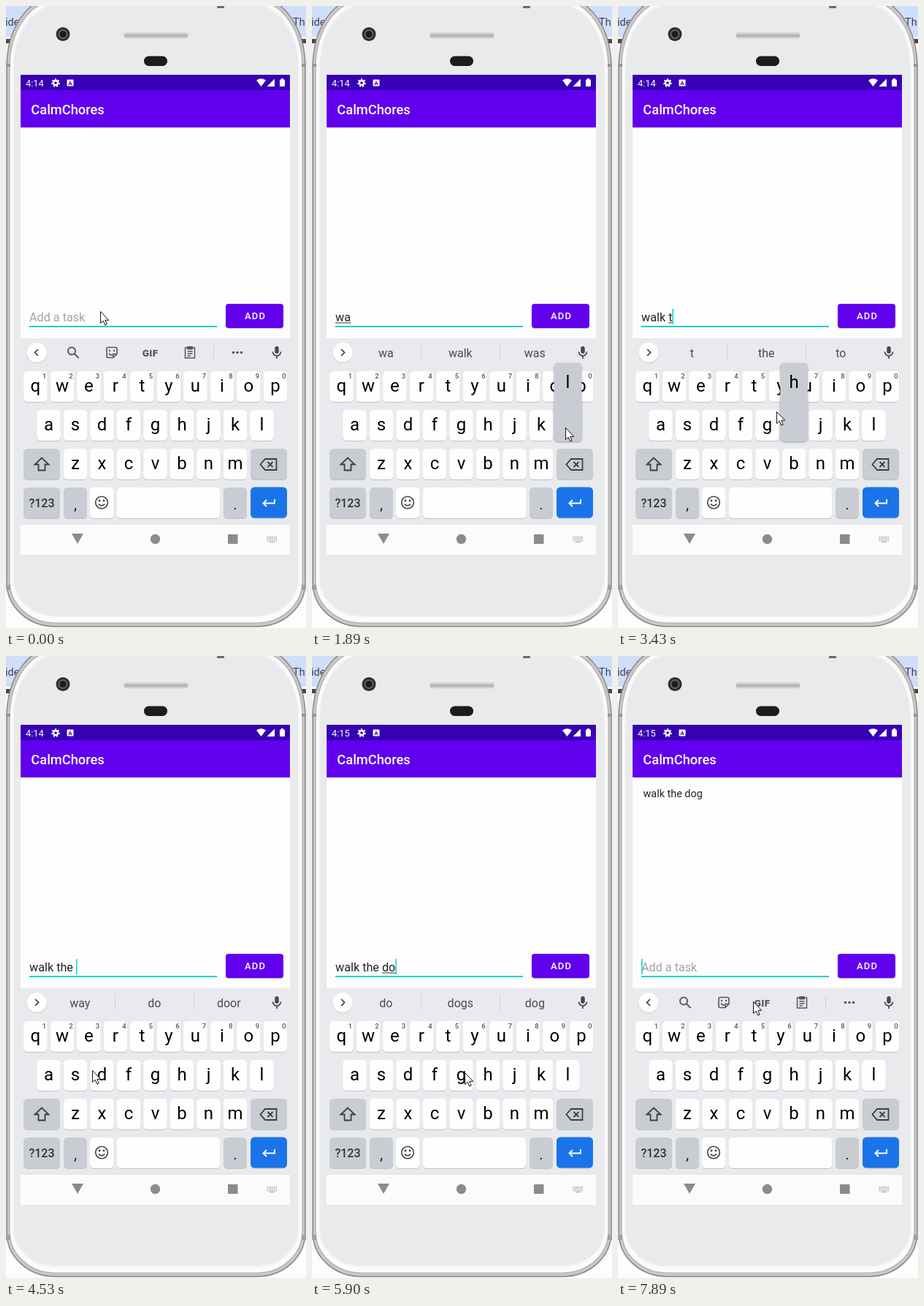
An HTML page with a canvas that plays this animation: 411x850 px, repeating every 8 s.

```html
<!DOCTYPE html>
<html lang="en">
<head>
<meta charset="utf-8">
<title>Task list demo</title>
<style>
  html, body { margin: 0; height: 100%; overflow: hidden; background: #fff; }
  canvas { display: block; width: 411px; height: 850px; }
</style>
</head>
<body>
<canvas width="411" height="850"></canvas>
<script>
const canvas = document.querySelector('canvas');
const screenCtx = canvas.getContext('2d');
let ctx = screenCtx;

const LOOP = 8000;
const INK = '#000', ICON = '#54575b', FUNCTION_KEY = '#caccd3', PURPLE = '#6100ed';

// The picture is held between steps: [start, count], 120 ms apart within a run.
const STEPS = [
  [0, 1], [280, 7], [1150, 1], [1290, 7], [2130, 3], [2510, 2], [2800, 3],
  [3190, 4], [3700, 1], [3850, 1], [4000, 3], [4380, 1], [4530, 4], [5040, 4],
  [5540, 4], [6050, 1], [6200, 4], [6720, 1], [6860, 1], [7110, 4], [7620, 2], [7890, 1]
].flatMap(([start, count]) => Array.from({ length: count }, (_, i) => start + i * 120));

// Time, field text, suggestions
const EDITS = [
  [-600, '', null],
  [760, 'w', ['w', 'with', 'what']],
  [1290, 'wa', ['wa', 'walk', 'was']],
  [2010, 'wal', ['wal', 'walk', 'wall']],
  [2250, 'walk', ['walk', 'Walk', 'walking']],
  [2800, 'walk ', ['to', 'the', 'with']],
  [3190, 'walk t', ['t', 'the', 'to']],
  [3550, 'walk th', ['th', 'the', 'that']],
  [3850, 'walk the', ['the', 'they', 'then']],
  [4380, 'walk the ', ['way', 'do', 'door']],
  [5040, 'walk the d', ['d', 'do', 'day']],
  [5540, 'walk the do', ['do', 'dogs', 'dog']],
  [6050, 'walk the dog', ['dog', 'Dog', 'Dogs']],
  [6720, '', null]
];

// Key, pressed from, released at
const PRESSES = [
  ['w', 640, 760], ['l', 1890, 2010], ['k', 2130, 2250], [' ', 2640, 2800],
  ['t', 3040, 3190], ['h', 3430, 3550], ['e', 3850, 4000], ['d', 4770, 5040], ['o', 5400, 5540]
];

// Time, x, y of the mouse pointer
const POINTER = [
  [160, 129, 417], [640, 70, 515], [1000, 64, 549], [1150, 63, 555], [1290, 63, 557],
  [1770, 345, 574], [1890, 347, 576], [2010, 312, 574], [2250, 308, 577], [2370, 235, 649],
  [2510, 217, 679], [2800, 217, 679], [3040, 186, 523], [3190, 190, 528], [3430, 217, 554],
  [3550, 162, 534], [3700, 108, 516], [3850, 108, 518], [4240, 150, 671], [4380, 165, 646],
  [4530, 118, 566], [5040, 124, 571], [5400, 325, 523], [5540, 324, 525], [5900, 209, 569],
  [6050, 240, 491], [6570, 340, 420], [6720, 340, 420], [6860, 244, 416], [7110, 225, 372],
  [7470, 180, 249], [7740, 184, 464], [7890, 185, 472]
];

const ROWS = [
  { keys: 'qwertyuiop', x: 40.4, top: 499 },
  { keys: 'asdfghjkl', x: 58.5, top: 552 },
  { keys: 'zxcvbnm', x: 95, top: 605 }
];
const PITCH = 36.5;

function rect(x, y, w, h, color, radius = 0) {
  ctx.fillStyle = color;
  ctx.beginPath();
  ctx.roundRect(x, y, w, h, radius);
  ctx.fill();
}

function circle(x, y, r, color) {
  rect(x - r, y - r, 2 * r, 2 * r, color, r);
}

function shape(d, x, y, fill, stroke, width = 1.7) {
  const path = new Path2D(d);
  ctx.save();
  ctx.translate(x, y);
  if (fill) { ctx.fillStyle = fill; ctx.fill(path); }
  if (stroke) { ctx.strokeStyle = stroke; ctx.lineWidth = width; ctx.stroke(path); }
  ctx.restore();
}

function text(str, x, y, size, color, { weight = 400, align = 'left', spacing = 0 } = {}) {
  ctx.font = `${weight} ${size}px Roboto, sans-serif`;
  ctx.letterSpacing = spacing + 'px';
  ctx.textAlign = align;
  ctx.fillStyle = color;
  ctx.fillText(str, x, y);
  const width = ctx.measureText(str).width;
  ctx.letterSpacing = '0px';
  return width;
}

function shadowed(blur, offset, color, draw) {
  ctx.save();
  ctx.shadowBlur = blur;
  ctx.shadowOffsetY = offset;
  ctx.shadowColor = color;
  draw();
  ctx.restore();
}

function keyCap(x, top, w, color = '#fefefe') {
  rect(x, top + 1, w, 42, '#bfc1c6', 5.5);
  rect(x, top, w, 42, color, 5.5);
}

function drawPhone() {
  rect(0, 0, 411, 850, '#fdfdfd');
  rect(0, 0, 411, 42, '#cfdffa');
  rect(0, 45, 411, 6, '#4b4644');
  text('ide', -1, 27, 14.5, '#39424f');
  text('Th', 393, 27, 14.5, '#39424f');

  // Nested outlines: metal edge, bright bevel, front panel
  shape('M1 83A66 95 0 0 1 67 -12H344A66 95 0 0 1 410 83V788A66 60 0 0 1 344 848H67A66 60 0 0 1 1 788Z',
    0, 0, '#cbc7c8', '#8b8688', 1.5);
  shape('M5 84A63 91 0 0 1 68 -7H343A63 91 0 0 1 406 84V786A62 57 0 0 1 344 843H67A62 57 0 0 1 5 786Z',
    0, 0, '#fbfbfb', '#b3aeaf', 1.2);
  shape('M10 86A60 88 0 0 1 70 -2H341A60 88 0 0 1 401 86V782A57 52 0 0 1 344 834H67A57 52 0 0 1 10 782Z',
    0, 0, '#e9eaec', '#f3f3f4', 2);
  for (const x of [0, 405]) {
    rect(x, 79, 6, 4, '#989394');
    rect(x, 791, 6, 7, '#a39e9f');
  }
  rect(289, 0, 10, 3, '#6d696b', 1);

  circle(78, 38.5, 9.5, '#2d2d30');
  circle(78, 38.5, 6.5, '#606266');
  circle(78, 38.5, 4.5, '#1a1b1e');
  rect(161, 36, 89, 8.5, '#d6d4d5', 4);
  rect(162, 38.5, 87, 4, '#b9b5b6', 2);
  rect(189, 68.5, 32, 13.5, '#1d1b1e', 6.5);
}

function drawStatusBar() {
  rect(20, 94, 369, 22, '#3800b3');
  rect(20, 115, 369, 51, PURPLE);
  text('CalmChores', 34.3, 148, 18.3, '#fff', { weight: 500 });

  ctx.save();
  ctx.setLineDash([2.1, 2.1]);
  shape('M4.8 0A4.8 4.8 0 1 1 -4.8 0A4.8 4.8 0 1 1 4.8 0', 68, 105, null, '#fff', 2);
  ctx.restore();
  shape('M3 0A3 3 0 1 1 -3 0A3 3 0 1 1 3 0', 68, 105, null, '#fff', 2.4);
  rect(83.5, 100.5, 9, 9, '#fff', 1);
  text('A', 88, 108, 8, '#3800b3', { weight: 700, align: 'center' });

  shape('M-6.5 -3.5Q0 -8 6.5 -3.5L0 5Z', 349.5, 105, '#fff');
  shape('M5 -5.5V5H-5.5Z', 363, 105, '#fff');
  rect(375, 100.5, 7, 9.5, '#fff', 1);
  rect(377, 99, 3, 2, '#fff');
}

function drawKeyboard() {
  rect(20, 454, 369, 254, '#e8eaed');
  ROWS.forEach((row, r) => [...row.keys].forEach((key, i) => {
    const x = row.x + i * PITCH;
    keyCap(x - 16.3, row.top, 32.6);
    text(key, x, row.top + 28, 24, INK, { align: 'center' });
    if (r === 0) text(String((i + 1) % 10), x + 12, 509, 9.5, ICON, { weight: 500, align: 'center' });
  }));

  keyCap(24, 605, 50, FUNCTION_KEY);
  shape('M0 -9L-9.5 0H-4.5V8H4.5V0H9.5Z', 49, 626.5, null, '#3b3d41', 1.8);
  keyCap(335, 605, 50, FUNCTION_KEY);
  shape('M-11.5 0L-5 -7.5H10.5V7.5H-5ZM-1.5 -3.5L5.5 3.5M5.5 -3.5L-1.5 3.5', 360, 626.5, null, '#3b3d41', 1.8);

  keyCap(24, 658, 50, FUNCTION_KEY);
  text('?123', 49, 685, 16, '#303236', { weight: 500, align: 'center' });
  keyCap(79, 658, 32, FUNCTION_KEY);
  text(',', 95, 688, 21, '#202124', { align: 'center' });
  keyCap(115, 658, 32.5);
  shape('M8.3 0A8.3 8.3 0 1 1 -8.3 0A8.3 8.3 0 1 1 8.3 0M-4.2 2Q0 6.8 4.2 2', 131, 678.5, null, '#404246', 1.6);
  circle(128, 676, 1.4, '#404246');
  circle(134, 676, 1.4, '#404246');
  keyCap(152, 658, 141.5);
  keyCap(298, 658, 32, FUNCTION_KEY);
  text('.', 314, 688, 21, '#202124', { align: 'center' });
  keyCap(335, 657.5, 50, '#1a73e8');
  shape('M8 -5V0.5H-7M-3 -4L-7.5 0.5L-3 5', 360, 679, null, '#fff', 1.9);
}

function drawNavigation() {
  rect(20, 708, 369, 42, '#fbfbfc');
  rect(20, 707.5, 369, 1, '#dfe0e3');
  shape('M-8 -7H8L0 7Z', 98, 728, '#8b8b8b');
  circle(204.5, 728.5, 6.7, '#8b8b8b');
  rect(304, 722, 13.5, 13, '#8b8b8b');
  for (let row = 0; row < 3; row++)
    for (let col = 0; col < 6; col++) rect(357.5 + col * 2.4, 725 + row * 2.4, 1.4, 1.4, '#a2a2a2');
  rect(361, 732, 7, 1, '#a2a2a2');
}

function drawToolbar(suggestions) {
  shadowed(2, 1, '#0002', () => circle(42, 473.5, 13.5, '#fefefe'));
  shape(suggestions ? 'M-2 -4.5L2.5 0L-2 4.5' : 'M2 -4.5L-2.5 0L2 4.5', 42, 473.5, null, '#3c4043', 1.7);
  rect(368.3, 465, 5.4, 10, '#45474b', 2.7);
  shape('M-5.5 -1A5.5 5.5 0 0 0 5.5 -1M0 4.5V8.5', 371, 473.5, null, '#45474b', 1.7);

  if (suggestions) {
    suggestions.forEach((word, i) =>
      text(word, 101.3 + i * 102, 480, 16, '#484b4f', { align: 'center' }));
    for (const x of [149, 257]) rect(x, 463, 1, 21, '#cfd1d5');
    return;
  }
  shape('M3 -2A5 5 0 1 1 -7 -2A5 5 0 1 1 3 -2M1.8 1.8L7.5 7.5', 92, 473.5, null, ICON, 2);
  shape('M-5 -7H5Q7 -7 7 -5V2L2 7H-5Q-7 7 -7 5V-5Q-7 -7 -5 -7ZM2 7V2H7M-4 1Q-2 4.5 1 3', 145, 473.5, null, ICON, 1.6);
  circle(142, 471, 1.2, ICON);
  circle(148, 471, 1.2, ICON);
  text('GIF', 197.7, 478.5, 13.5, ICON, { weight: 900, align: 'center', spacing: 0.4 });
  shape('M-6.5 -6.5H6.5V7.5H-6.5ZM-3.5 -1.5H3.5M-3.5 1.5H3.5M-3.5 4.5H1', 252, 473.5, null, ICON, 1.5);
  rect(248, 465, 8, 4.5, ICON, 1);
  rect(284, 464, 1, 20, '#cfd1d5');
  for (const x of [311.5, 317, 322.5]) circle(x, 473.5, 1.8, ICON);
}

function drawField(content, caretOn) {
  const x = 32, baseline = 431, size = 16.2;
  let end = x;
  if (content) {
    end += text(content, x, baseline, size, '#212121');
    const wordStart = content.lastIndexOf(' ') + 1;
    const left = x + ctx.measureText(content.slice(0, wordStart)).width;
    rect(left, 432.5, end - left, 1, '#303030');
  } else {
    text('Add a task', x, baseline, size, '#a3a3a3');
  }
  rect(32, 437, 257, 2, '#14d3c4');
  if (caretOn) rect(end, 414, 1.6, 21, '#14d3c4');
}

function drawButton(glow) {
  shadowed(glow ? 4 : 1, 1, '#0004', () => rect(301, 407, 79, 33, PURPLE, 4));
  if (glow) rect(301, 407, 79, 33, `rgba(255,255,255,${glow})`, 4);
  text('ADD', 341.5, 428, 13, '#fff', { weight: 500, align: 'center', spacing: 1.2 });
}

function drawPress(key) {
  if (key === ' ') return keyCap(152, 658, 141.5, FUNCTION_KEY);
  const row = ROWS.find(r => r.keys.includes(key));
  const x = row.x + row.keys.indexOf(key) * PITCH;
  shadowed(3, 1, '#0005', () => rect(x - 18.7, row.top - 64, 37.4, 107, FUNCTION_KEY, 5));
  text(key, x, row.top - 30, 24, INK, { align: 'center' });
}

function pointerAt(t) {
  const next = POINTER.findIndex(p => p[0] > t);
  if (next < 0) return POINTER.at(-1).slice(1);
  if (next === 0) return POINTER[0].slice(1);
  const [t0, x0, y0] = POINTER[next - 1], [t1, x1, y1] = POINTER[next];
  const k = (t - t0) / (t1 - t0);
  return [x0 + (x1 - x0) * k, y0 + (y1 - y0) * k];
}

const backdrop = document.createElement('canvas');
backdrop.width = canvas.width;
backdrop.height = canvas.height;
ctx = backdrop.getContext('2d');
drawPhone();
drawStatusBar();
rect(20, 166, 369, 288, '#fdfdfd');
drawKeyboard();
drawNavigation();
ctx = screenCtx;

function render(now) {
  const time = now % LOOP;
  const t = STEPS.findLast(step => step <= time);
  const [editedAt, content, suggestions] = EDITS.findLast(edit => edit[0] <= t);

  ctx.drawImage(backdrop, 0, 0);
  text(t < 5660 ? '4:14' : '4:15', 27, 110, 12.8, '#fff');
  if (t >= 6720) text('walk the dog', 34.5, 193, 14.4, '#252525');
  drawField(content, (t - editedAt) % 1000 < 500);
  drawButton(t >= 6860 || t < 6560 ? 0 : t < 6720 ? 0.24 : 0.14);
  drawToolbar(suggestions);
  for (const [key, from, to] of PRESSES) if (t >= from && t < to) drawPress(key);

  const [x, y] = pointerAt(t);
  shape('M0.5 0.5V16.5L4.2 13.2L6.7 19L9.2 18L6.8 12.3H11.7Z', Math.round(x), Math.round(y), '#fff', '#111', 1);
}

const startTime = performance.now();
function tick() {
  render(performance.now() - startTime);
  requestAnimationFrame(tick);
}
tick();
</script>
</body>
</html>
```
